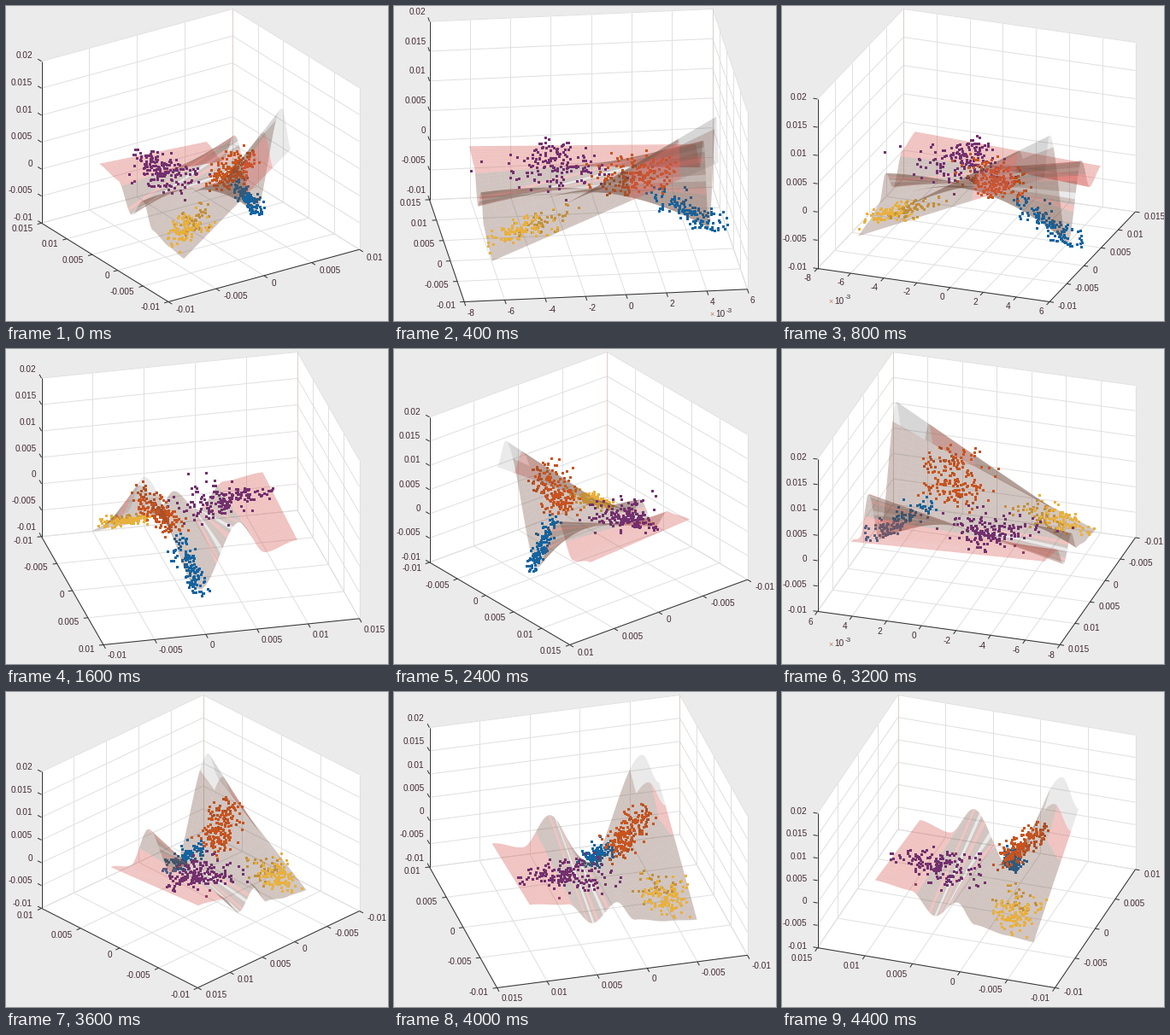
A matplotlib script for the animation above (4800 ms loop, 447 by 369 pixels).

```python
import numpy as np
import matplotlib.pyplot as plt
from matplotlib.animation import FuncAnimation
from matplotlib.collections import LineCollection, PolyCollection
from matplotlib.colors import to_rgba

W, H, DPI = 447, 369, 100
PX = 72 / DPI
LEFT, RIGHT, TOP, BOTTOM = 41.5, 413.5, 3.5, 346.5
INK, RULE, GRID, SEAM = "#432833", "#303030", "#e0e0e0", "#dccfc8"

AZIMUTH = [-33.6, -7, 20.3, 48, 76.4, 109, 141.7, 169.5, 197.3, 226, 254.9, 288.7]
ELEVATION = [30.3, 30, 29.5, 32.3, 35.1, 35.5, 35.9, 36.1, 36.4, 39, 41.9, 42.9]

# Data is in thousandths.
X_MIN, X_MAX, Y_MIN, Y_MAX = -6.35, 4.85, -6.2, 10.5
NEAR = ([-6.2, -3.3, 0, 1.8, 4.2, 6.7, 10.5], [-6, -5.5, -4.3, 0, -3.9, 0.9, 1.85])
FAR = ([-6.2, -4.5, 1, 4.8, 7.35, 10.5], [8.9, 15.4, -7, 5, -1.2, 0.5])

PINK = (0.84, 0.35, 0.32, 0.36)
TAUPE = (0.44, 0.29, 0.23, 0.32)
PALE = (0.1, 0.1, 0.1, 0.09)


def smooth(knots, y):
    """Ease between knots with flat tangents."""
    ky, kz = map(np.array, knots)
    i = np.clip(np.searchsorted(ky, y) - 1, 0, len(ky) - 2)
    t = (y - ky[i]) / (ky[i + 1] - ky[i])
    return kz[i] + (kz[i + 1] - kz[i]) * t * t * (3 - 2 * t)


def height(x, y):
    t = (x - X_MIN) / (X_MAX - X_MIN)
    bump = 22 * t * (1 - t) * np.exp(-(y / 2) ** 2)
    return smooth(NEAR, y) * (1 - t) + smooth(FAR, y) * t + bump


def sheet_color(row, x, y):
    if y > 6.2:
        return PINK
    if 2.6 < y < 4.8:
        return (TAUPE, TAUPE, PINK, TAUPE, PALE)[row % 5]
    if y < -3.3 and x > 2.7:
        return PALE
    if y < -4.8 and x > 0.2:
        return PINK
    return TAUPE


def make_sheet(nx=18, ny=80):
    x, y = np.meshgrid(np.linspace(X_MIN, X_MAX, nx + 1),
                       np.linspace(Y_MIN, Y_MAX, ny + 1))
    p = np.stack([x, y, height(x, y)], axis=-1)
    quads = np.stack([p[:-1, :-1], p[:-1, 1:], p[1:, 1:], p[1:, :-1]], axis=2)
    quads = quads.reshape(-1, 4, 3)
    colors = [sheet_color(i // nx, *q.mean(axis=0)[:2]) for i, q in enumerate(quads)]
    return quads, colors


def make_points():
    rng = np.random.default_rng(4)
    n = rng.normal

    k = 165
    y = np.clip(n(5.3, 2.2, k), 0.3, 10.4)
    spread = np.clip(1.6 - 0.12 * y, 0.4, 1.3)
    purple = np.c_[-2.5 + n(0, 1.2, k) * spread, y,
                   1.8 + 0.15 * (y - 5.8) + n(0, 0.9, k) * spread]

    k = 190
    t = rng.beta(1.3, 1.5, k)
    orange = np.c_[0.6 + 0.9 * t + n(0, 1.0, k), -0.1 - 4.1 * t + n(0, 0.6, k),
                   0.7 + 7.8 * t + n(0, 1.0, k)]

    k = 125
    t = rng.beta(1.5, 1.3, k)
    blue = np.c_[2 + 3.5 * t + n(0, 0.35, k), -0.4 + 1.4 * t + n(0, 0.5, k),
                 0.2 - 7.4 * t + n(0, 0.8, k)]

    k = 140
    x = np.clip(n(-4.5, 1.0, k), -6.4, -1.8)
    yellow = np.c_[x, np.clip(n(-3.6, 1.25, k), -6.2, 0),
                   -2.6 + 0.85 * (x + 4.6) + n(0, 0.5, k)]

    groups = [(purple, "#73306e"), (orange, "#c8541f"),
              (blue, "#1464a0"), (yellow, "#e8b03c")]
    colors = [to_rgba(c) for g, c in groups for _ in g]
    return np.vstack([g for g, _ in groups]), colors


class View:
    """Orthographic box stretched to fill the plot rectangle."""

    def __init__(self, az, el):
        az, el = np.radians([az, el])
        self.c, self.s = np.cos(az), np.sin(az)
        self.ce, self.se = np.cos(el), np.sin(el)
        self.fine = abs(self.c) > 0.92
        xlim = (-8, 6) if self.fine else (-10, 10)
        self.lims = np.array([xlim, (-10, 15), (-10, 20)], float)
        box = np.array([[self.lims[0, i], self.lims[1, j], self.lims[2, k]]
                        for i in (0, 1) for j in (0, 1) for k in (0, 1)])
        uv = self.raw(box)[:, :2]
        self.lo, self.hi = uv.min(axis=0), uv.max(axis=0)

    def raw(self, p):
        p = (np.asarray(p, float) - self.lims[:, 0]) / np.ptp(self.lims, axis=1)
        x, y, z = np.moveaxis(p, -1, 0)
        away = y * self.c - x * self.s
        return np.stack([x * self.c + y * self.s, z * self.ce + away * self.se,
                         z * self.se - away * self.ce], axis=-1)

    def project(self, p):
        """Return pixel positions and nearness to the viewer."""
        r = self.raw(p)
        f = (r[..., :2] - self.lo) / (self.hi - self.lo)
        px = np.stack([LEFT + (RIGHT - LEFT) * f[..., 0],
                       BOTTOM - (BOTTOM - TOP) * f[..., 1]], axis=-1)
        return px, r[..., 2]

    def px(self, *p):
        return self.project(p)[0]

    def ticks(self, axis):
        lo, hi = self.lims[axis]
        step = 2 if axis == 0 and self.fine else 5
        return np.arange(lo, hi + 0.1, step)


def label(x, y, s, ha, size=10, color=INK):
    ax.text(x, y, s, ha=ha, va="center", fontsize=size * PX, color=color,
            family="Liberation Sans")


def draw_walls(v, back, front):
    z0, z1 = v.lims[2]
    ring = [(front[0], front[1]), (front[0], back[1]),
            (back[0], back[1]), (back[0], front[1])]
    floor = [v.px(*c, z0) for c in ring]
    walls = [[v.px(*ring[i], z0), v.px(*back, z0), v.px(*back, z1), v.px(*ring[i], z1)]
             for i in (1, 3)]
    ax.add_collection(PolyCollection([floor] + walls, facecolors="white",
                                     edgecolors="white", linewidths=0.5))
    lines = []
    for t in v.ticks(0):
        a, b = (t, back[1], z0), (t, back[1], z1)
        lines += [[v.px(t, front[1], z0), v.px(*a)], [v.px(*a), v.px(*b)]]
    for t in v.ticks(1):
        a, b = (back[0], t, z0), (back[0], t, z1)
        lines += [[v.px(front[0], t, z0), v.px(*a)], [v.px(*a), v.px(*b)]]
    for t in v.ticks(2):
        corner = v.px(*back, t)
        lines += [[v.px(*ring[i], t), corner] for i in (1, 3)]
    ax.add_collection(LineCollection(lines, colors=GRID, linewidths=PX))
    seam = [v.px(*back, z0), v.px(*back, z1)]
    ax.add_collection(LineCollection([seam], colors=SEAM, linewidths=PX))


def draw_axis(v, axis, start, out):
    """Rule, ticks and labels; `out` is the unit pixel direction of the ticks."""
    ends = [np.array(start, float) for _ in (0, 1)]
    for e, lim in zip(ends, v.lims[axis]):
        e[axis] = lim
    lines = [[v.px(*e) for e in ends]]
    gap, drop = (12, 0) if axis == 2 else (10, 4)
    ha = "right" if out[0] < 0 else "left"
    if axis != 2 and abs(out[0]) < 0.3:
        ha = "center"
    for t in v.ticks(axis):
        p = np.array(start, float)
        p[axis] = t
        q = v.px(*p)
        lines.append([q, q + 5 * out])
        x, y = q + gap * out + (0, drop)
        value = t if axis == 0 and v.fine else t / 1000
        label(x, y, f"{value:g}", ha)
    ax.add_collection(LineCollection(lines, colors=RULE, linewidths=PX))
    if axis == 0 and v.fine:
        x, y = min(lines[0], key=lambda q: q[1])
        x = x + 13 if x < W / 2 else x - 44
        y = min(y + 38, 361)
        label(x, y + 1, "×", "left", 9, "#c07a58")
        label(x + 7, y, "10", "left")
        label(x + 19, y - 4, "-3", "left", 8)


def draw_data(v):
    quads, near = v.project(SHEET)
    dots, dot_near = v.project(POINTS)
    square = 1.5 * np.array([(-1, -1), (1, -1), (1, 1), (-1, 1)])
    dots = np.floor(dots)[:, None] + 0.5 + square
    polys = np.concatenate([quads, dots])
    depth = np.concatenate([near.mean(axis=1), dot_near + 0.02])
    order = np.argsort(depth)
    # Antialiased edges let neighbouring translucent quads meet without seams.
    ax.add_collection(PolyCollection(polys[order], facecolors=COLORS[order],
                                     edgecolors="none", linewidths=0,
                                     antialiaseds=True, snap=False, zorder=3))


def draw(i):
    ax.clear()
    ax.set_xlim(0, W)
    ax.set_ylim(H, 0)
    ax.axis("off")
    v = View(AZIMUTH[i], ELEVATION[i])
    z0 = v.lims[2, 0]
    corners = [(x, y) for x in v.lims[0] for y in v.lims[1]]
    spot = {c: v.px(*c, z0) for c in corners}
    front = max(corners, key=lambda c: spot[c][1])
    back = min(corners, key=lambda c: spot[c][1])
    left = min(corners, key=lambda c: spot[c][0])

    def outward(a, b):
        d = spot[b] - spot[a]
        return d / np.hypot(*d)

    draw_walls(v, back, front)
    draw_axis(v, 0, (*front, z0), outward((front[0], back[1]), front))
    draw_axis(v, 1, (*front, z0), outward((back[0], front[1]), front))
    draw_axis(v, 2, (*left, z0), outward(front, left))
    draw_data(v)
    return []


SHEET, sheet_colors = make_sheet()
POINTS, point_colors = make_points()
COLORS = np.array(sheet_colors + point_colors)

fig = plt.figure(figsize=((W + 0.01) / DPI, (H + 0.01) / DPI), dpi=DPI,
                 facecolor="#ebebeb")
ax = fig.add_axes([0, 0, 1, 1])
anim = FuncAnimation(fig, draw, frames=12, interval=400, repeat=True,
                     repeat_delay=0, init_func=lambda: [], blit=False)
plt.show()
```
